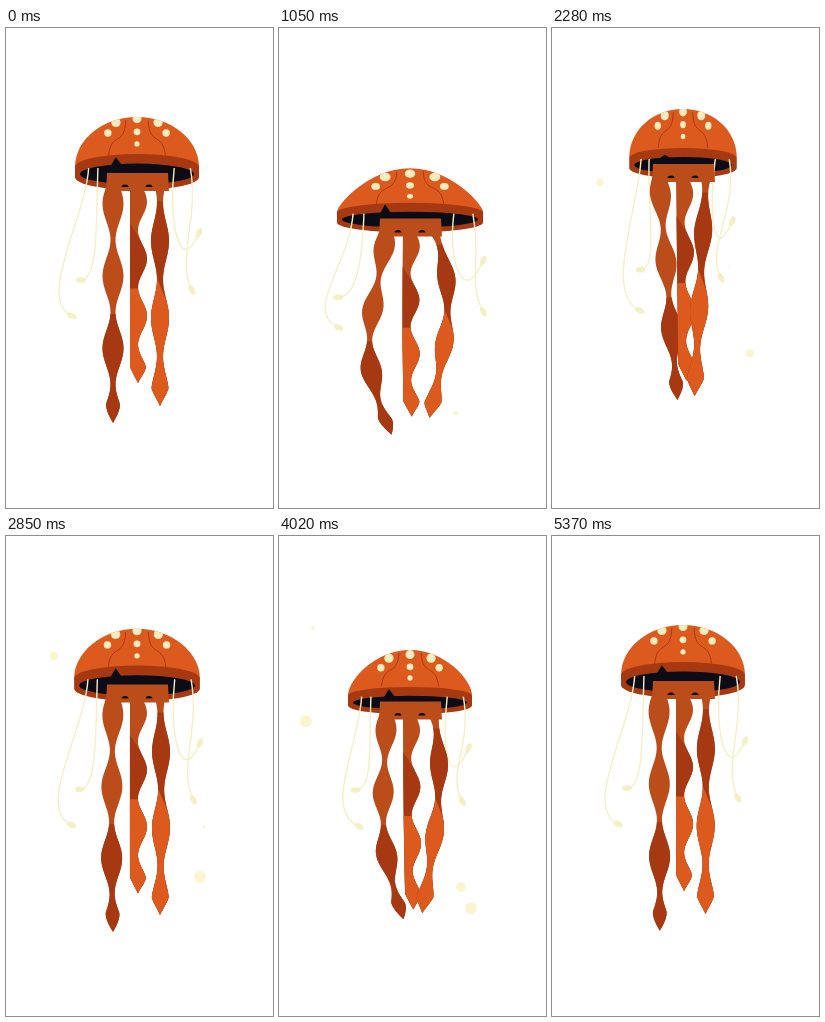
Write an HTML page with a canvas that moves like this. It is 267 by 480 pixels and loops after 5.4 s.

```html
<!DOCTYPE html>
<html lang="en">
<head>
<meta charset="utf-8">
<title>Jellyfish</title>
<style>
html, body { margin: 0; width: 100%; height: 100%; overflow: hidden; background: #fff; }
canvas { display: block; width: 267px; height: 480px; }
</style>
</head>
<body>
<canvas id="stage" width="267" height="480"></canvas>
<script>
const g = document.getElementById('stage').getContext('2d');
const { PI, sin, cos, min, max, sqrt, atan2 } = Math;
const LOOP = 5400, PULSE = 2700, OPEN = 900, CLOSED = 1830, CX = 131;
const ORANGE = '#dc5a1d', RUST = '#a63912', BODY = '#bb4d1a', INK = '#0b0c16', CREAM = '#fbebbd', PALE = '#f5efc6';

// One pulse swings from rest to open to closed; these weigh the last two poses
let open, closed, gather;
const ease = (t, a, b) => (1 - cos(PI * max(0, min(1, (t - a) / (b - a))))) / 2;
function setPose(t) {
  const shut = ease(t, OPEN, CLOSED);
  open = ease(t, 0, OPEN) - shut;
  closed = shut - ease(t, CLOSED, PULSE);
  gather = closed ** .6;
}
const pose = (rest, o, c) => rest + (o - rest) * open + (c - rest) * closed;

// Tentacles: place on the rim, first bend, hook before the tip, tip at rest, open and closed
const tentacles = [
  { u: -.78, bend: -3, hook: [-36, -16], x: [66, 56, 112], y: [288, 301, 276] },
  { u: -.63, bend: -2, hook: [18, 0], x: [75, 56, 104], y: [252, 272, 230] },
  { u: .6, bend: -6, hook: [-20, 46], x: [193, 207, 166], y: [205, 236, 180] },
  { u: .86, bend: 9, hook: [-16, -30], x: [186, 208, 150], y: [262, 287, 236] }
];

// Legs: drift of the tip when gathered, sideways bow when open, wavy width,
// and colours as [start, slant, colour], each running on to the tip
const legs = [
  { x: 107, drift: 29, bow: -21, skew: 1.3, end: [395, 411, 346], mean: 6.5, amp: 4, period: .305, peak: .075,
    colors: [[0, 0, BODY], [.54, 0, RUST]] },
  { x: 132, drift: 4, bow: -1, skew: 1, end: [355, 391, 350], mean: 4.5, amp: 4.5, period: .29, peak: .08, straight: true,
    colors: [[0, 0, BODY], [.23, .04, RUST], [.52, 0, ORANGE]] },
  { x: 154, drift: -18, bow: 17, skew: .75, end: [378, 392, 357], mean: 6, amp: 3, period: .35, peak: .25,
    colors: [[0, 0, BODY], [.07, 0, RUST], [.47, .05, ORANGE]] }
];

// Bubbles: x, y at birth, radius, birth, upward speed
const LIFE = 1500;
const bubbles = [
  [177, 409, 4, 850, .119],
  [198, 375, 4, 1450, .06],
  [48, 171, 4, 2000, .06],
  [194, 377, 6, 2250, .06],
  [182, 410, 5, 3037, .06],
  [34, 164, 2, 3060, .075],
  [27, 223, 6, 3390, .06],
  [192, 410, 6, 3390, .06]
];

function oval(x, y, rx, ry, color, turn = 0) {
  g.fillStyle = color;
  g.beginPath();
  g.ellipse(x, y, rx, ry, turn, 0, 2 * PI);
  g.fill();
}

function shape(points, color) {
  g.fillStyle = color;
  g.beginPath();
  points.forEach(p => g.lineTo(...p));
  g.fill();
}

function drawLeg(leg, start) {
  const end = pose(...leg.end);
  const edge = (side, s) => {
    const taper = min(1, (1 - s) / .08);
    const wave = leg.mean + leg.amp * cos(2 * PI * (s - leg.peak) / leg.period);
    const width = side < 0 && leg.straight ? 8 : wave;
    const center = leg.x + leg.drift * gather * s + leg.bow * open * sin(PI * s ** leg.skew);
    return [center + side * width * taper, start + (end - start) * s];
  };
  for (const [from, slant, color] of leg.colors) {
    const left = [], right = [];
    for (let i = 0; i <= 60; i++) {
      const mix = a => a + (1 - a) * i / 60;
      left.unshift(edge(-1, mix(from - slant)));
      right.push(edge(1, mix(from + slant)));
    }
    shape(right.concat(left), color);
  }
}

function drawTentacle({ u, bend, hook, x, y }, rim, rx) {
  const x0 = CX + u * rx, y0 = rim - 4, x1 = pose(...x), y1 = pose(...y);
  g.strokeStyle = PALE;
  g.lineWidth = 1.4;
  g.beginPath();
  g.moveTo(x0, y0);
  g.bezierCurveTo(x0 + bend, y0 + 50, x1 + hook[0], y1 + hook[1], x1, y1);
  g.stroke();
  oval(x1, y1, 5, 2.8, PALE, atan2(-hook[1], -hook[0]));
}

function drawDome(top, rim, rx) {
  const base = rim - 5, h = rim - top;
  const side = base - pose(.5, .15, .55) * h, shift = pose(-.06, .02, -.02);
  const X = u => CX + u * rx, Y = v => top + v * h;

  g.save();
  g.beginPath();
  g.moveTo(X(-1), base);
  g.bezierCurveTo(X(-1), side, X(-.55), top, CX, top);
  g.bezierCurveTo(X(.55), top, X(1), side, X(1), base);
  g.fillStyle = ORANGE;
  g.fill();
  g.clip();

  const dot = (u, v, r) => oval(X(u), Y(v + shift), r * rx / 62, r * sqrt(62 / rx), CREAM);
  dot(0, .09, 4.5);
  dot(0, .33, 3.4);
  dot(0, .55, 2.6);
  g.strokeStyle = RUST;
  g.lineWidth = 1;
  for (const m of [-1, 1]) {
    g.beginPath();
    g.moveTo(X(.18 * m), Y(.06));
    g.bezierCurveTo(X(.2 * m), Y(.55), X(.42 * m), Y(.25), X(.46 * m), Y(.72));
    g.stroke();
    dot(.34 * m, .16, 4.6);
    dot(.47 * m, .35, 3.7);
  }
  g.restore();
}

function drawJelly() {
  const top = pose(89, 145, 72), rim = pose(144, 194, 125);
  const rx = pose(62, 75, 44.5), ry = pose(13, 10, 7);
  drawDome(top, rim, rx);

  g.fillStyle = RUST;
  g.beginPath();
  g.ellipse(CX, rim - 5, rx, ry, 0, PI, 0);
  g.ellipse(CX, rim + 5, rx, ry, 0, 0, PI);
  g.fill();
  oval(CX, rim + 2, rx - 5, ry * .8, INK);
  const nx = CX - .34 * rx, ny = rim + 3 - ry * .75;
  shape([[nx, ny - max(0, min(9, (rx - 46) / 2))], [nx - 5, ny], [nx + 6, ny]], INK);

  tentacles.forEach(k => drawTentacle(k, rim, rx));
  legs.forEach(leg => drawLeg(leg, rim + 14));
  shape([[101, rim + 1], [162, rim + 1], [163, rim + 19], [100, rim + 19]], BODY);
  for (const x of [119, 143]) {
    g.fillStyle = INK;
    g.beginPath();
    g.ellipse(x, rim + 15, 3.5, 2.5, 0, PI, 0);
    g.fill();
  }
}

function frame(now) {
  const t = now % LOOP;
  g.clearRect(0, 0, 267, 480);
  for (const [x, y, r, birth, speed] of bubbles) {
    const age = t - birth;
    const size = r * min(1, age / 300, (LIFE - age) / 300);
    if (size > 0) oval(x, y - age * speed, size, size, '#fbf5cf');
  }
  setPose(t % PULSE);
  drawJelly();
  requestAnimationFrame(frame);
}
requestAnimationFrame(frame);
</script>
</body>
</html>
```
